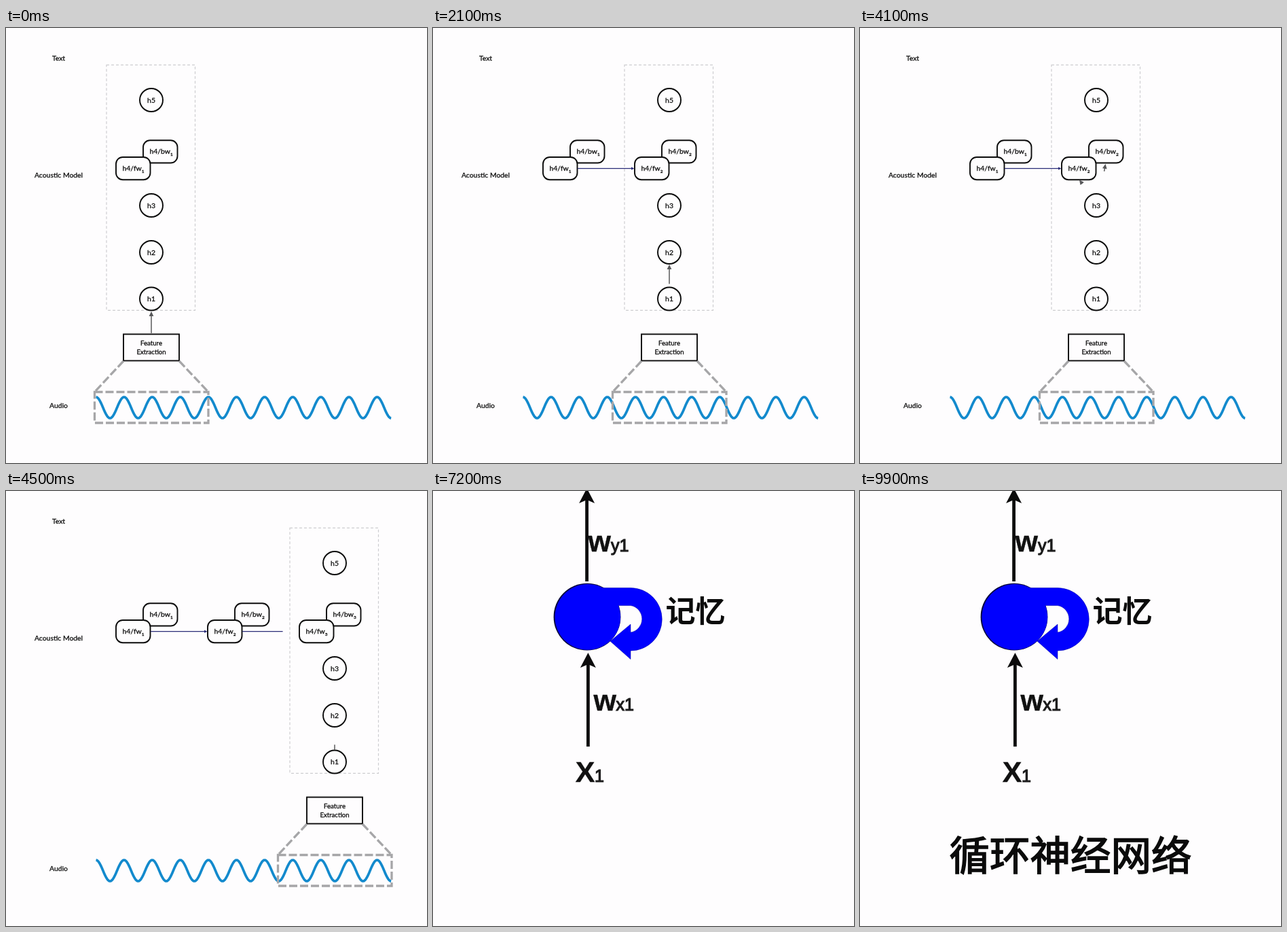
Write an HTML page that moves like this. It is 620 px wide and 640 px high and loops after 10000 ms.

```html
<!DOCTYPE html>
<html lang="zh-CN">
<head>
<meta charset="utf-8">
<style>
  html, body { margin: 0; width: 100%; height: 100%; overflow: hidden; background: #fefdfe; }
  svg { display: block; }
  .label { font: 10.4px Lato, "Open Sans", sans-serif; fill: #111; stroke: #111; stroke-width: .3; }
  .mid { text-anchor: middle; }
  .small { font-size: 9.6px; }
  .sub { font-size: 6.5px; }
  .box { fill: #fefdfe; stroke: #0c0c0c; stroke-width: 1.9; }
  .frame { fill: none; stroke: #cdcdd0; stroke-width: 1.2; stroke-dasharray: 4 3; }
  .window { fill: none; stroke: #a6a6a8; stroke-width: 3.3; stroke-dasharray: 12 4; }
  .latin { font-family: "Liberation Sans", Arial, sans-serif; fill: #111; }
  .big { font-size: 43px; font-weight: 700; stroke: #111; stroke-width: .4; }
  .index { font-size: 25px; fill: #1c1c1c; stroke: #1c1c1c; stroke-width: 1.2; }
  .han { font-family: "Noto Sans CJK SC", "Noto Sans CJK", sans-serif; fill: #0b0b0b; }
  .title { font-size: 59.5px; font-weight: 500; stroke: #0b0b0b; stroke-width: 1.7; }
</style>
</head>
<body>
<svg id="stage" width="620" height="640" viewBox="0 0 620 640"></svg>
<script>
const LOOP = 10000, CUT = 6100, TITLE_AT = 9400;
const COLUMN_X = [0, 134, 270];
const COLUMN_PHASE = [0, 10, 25];
const CELL_STEP = 135;

// Arrow sets of one upward pass, in the order they light up: x1, y1, x2, y2.
const STEPS = [
  [[214, 449, 214, 417]],
  [[214, 381, 214, 348]],
  [[214, 312, 214, 279]],
  [[206, 246, 189, 223.5], [220, 244, 227.5, 200]],
  [[190, 189, 207, 123], [224, 164, 217, 124]]
];

// Time in ms against the number of steps played.
const PACE = [[0, .4], [1200, 6.6], [2700, 15.16], [4100, 23.92], [5700, 32.5], [6100, 34.7]];

const clamp = v => Math.max(0, Math.min(1, v));
const $ = id => document.getElementById(id);

const text = (x, y, s, cls = "label mid") => `<text x="${x}" y="${y}" class="${cls}">${s}</text>`;

const node = (y, name) =>
  `<circle cx="214" cy="${y}" r="17" class="box"/>` + text(214, y + 3.5, name);

const cell = (x, y, name, i) =>
  `<rect x="${x}" y="${y}" width="50.5" height="33.2" rx="10" class="box"/>` +
  text(x + 9.5, y + 20, `${name}<tspan class="sub" dy="3">${i + 1}</tspan>`, "label");

const cellPair = i => `<g id="pair${i}" transform="translate(${CELL_STEP * i})">` +
  cell(202, 165.3, "h4/bw", i) + cell(162, 190, "h4/fw", i) + `</g>`;

function wavePath() {
  const left = 132.5, period = 41.4;
  let d = "";
  for (let x = left; x <= left + 10.5 * period; x += .9) {
    const y = 558.5 - 15.5 * Math.cos((x - left) / period * 2 * Math.PI);
    d += `${d ? "L" : "M"}${x.toFixed(1)} ${y.toFixed(2)}`;
  }
  return d;
}

// Visible part of an arrow between the fractions a and b of its length.
function arrow([x1, y1, x2, y2], a, b, color = "#58585a", width = 1.5, size = 7) {
  if (b <= a) return "";
  const length = Math.hypot(x2 - x1, y2 - y1);
  const ux = (x2 - x1) / length, uy = (y2 - y1) / length;
  const at = f => `${x1 + ux * length * f} ${y1 + uy * length * f}`;
  const end = Math.min(b, 1 - size / 2 / length);
  let out = end > a ? `<path d="M${at(a)}L${at(end)}" stroke="${color}" stroke-width="${width}"/>` : "";
  if (b === 1) {
    const bx = x2 - ux * size, by = y2 - uy * size, w = size * .48;
    out += `<path d="M${x2} ${y2}L${bx - uy * w} ${by + ux * w}L${bx + uy * w} ${by - ux * w}Z" fill="${color}"/>`;
  }
  return out;
}

const bigArrow = (x, tip, tail) =>
  `<path d="M${x} ${tail}V${tip + 14}" stroke="#0b0b0b" stroke-width="4.8"/>` +
  `<path d="M${x} ${tip}l11.5 22l-11.5 -5l-11.5 5Z" fill="#0b0b0b"/>`;

const model = `<g id="model">
  ${text(77.5, 48, "Text")}${text(77.5, 219.5, "Acoustic Model")}${text(77.5, 559, "Audio")}
  <g id="column">
    <rect x="148" y="54.3" width="130.5" height="361" class="frame"/>
    ${node(106, "h5")}${node(261, "h3")}${node(330, "h2")}${node(398.5, "h1")}
    <rect x="173" y="450.5" width="82" height="39" class="box"/>
    ${text(214, 467, "Feature", "label mid small")}${text(214, 480, "Extraction", "label mid small")}
  </g>
  ${[0, 1, 2].map(cellPair).join("")}
  <g id="links"></g>
  <g id="arrows"></g>
  <path d="${wavePath()}" fill="none" stroke="#138acd" stroke-width="3.7"/>
  <g id="window">
    <path d="M173 490L130.5 535.5M255 490L298 535.5" class="window"/>
    <rect x="130.5" y="535.5" width="167.5" height="45.5" class="window"/>
  </g>
</g>`;

const memory = `<g id="memory">
  ${bigArrow(226.6, -4, 133)}${bigArrow(228.4, 238, 376)}
  <circle cx="227" cy="185.2" r="49.4" fill="#06063c"/>
  <path d="M240 142.5H291A46 46 0 0 1 291 235V247.5L261 221L291 196V208A20 20 0 0 0 291 168.5H265Z"
    fill="#0000fe" stroke="#0000a0" stroke-width=".5"/>
  <circle cx="227.8" cy="185.4" r="48.3" fill="#0000fe"/>
  <g class="latin">
    ${text(228.6, 89, "w", "big")}${text(236.4, 323, "w", "big")}${text(209.8, 428, "X", "big")}
    ${text(262, 88.5, "y1", "index")}${text(269.5, 322.5, "x1", "index")}${text(238, 427.5, "1", "index")}
  </g>
  <text x="342.5" y="193" class="han" font-size="44" font-weight="700">记忆</text>
  <text id="title" x="310" y="558" class="han mid title">循环神经网络</text>
</g>`;

$("stage").innerHTML = model + memory;

const show = (id, on) => $(id).setAttribute("display", on ? "inline" : "none");

function phaseAt(t) {
  const i = Math.max(1, PACE.findIndex(p => p[0] >= t));
  const [t0, p0] = PACE[i - 1], [t1, p1] = PACE[i];
  return p0 + (p1 - p0) * (t - t0) / (t1 - t0);
}

function drawModel(t) {
  const phase = phaseAt(t);
  const column = COLUMN_PHASE.filter(p => phase >= p).length - 1;
  const shift = `translate(${COLUMN_X[column]})`;
  for (const id of ["column", "window", "arrows"]) $(id).setAttribute("transform", shift);
  for (let i = 0; i < 3; i++) show("pair" + i, i <= column);

  // Each arrow grows from its tail, holds, then its tail catches up with the head.
  const u = phase % 1;
  const grown = clamp(u / .3), erased = clamp((u - .7) / .3);
  $("arrows").innerHTML = STEPS[Math.floor(phase) % 5].map(s => arrow(s, erased, grown)).join("");

  let links = "";
  for (let i = 0; i < column; i++) {
    const x = 213 + CELL_STEP * i;
    const drawn = clamp((phase - COLUMN_PHASE[i + 1]) / 1.5);
    links += arrow([x, 206.7, x + 83.5, 206.7], 0, drawn, "#2b2d78", 1.3, 4.5);
  }
  $("links").innerHTML = links;
}

function render(t) {
  const first = t < CUT;
  show("model", first);
  show("memory", !first);
  if (first) drawModel(t);
  else show("title", t >= TITLE_AT);
}

const start = performance.now();
function tick() {
  render((performance.now() - start) % LOOP);
  requestAnimationFrame(tick);
}
render(0);
requestAnimationFrame(tick);
</script>
</body>
</html>
```
